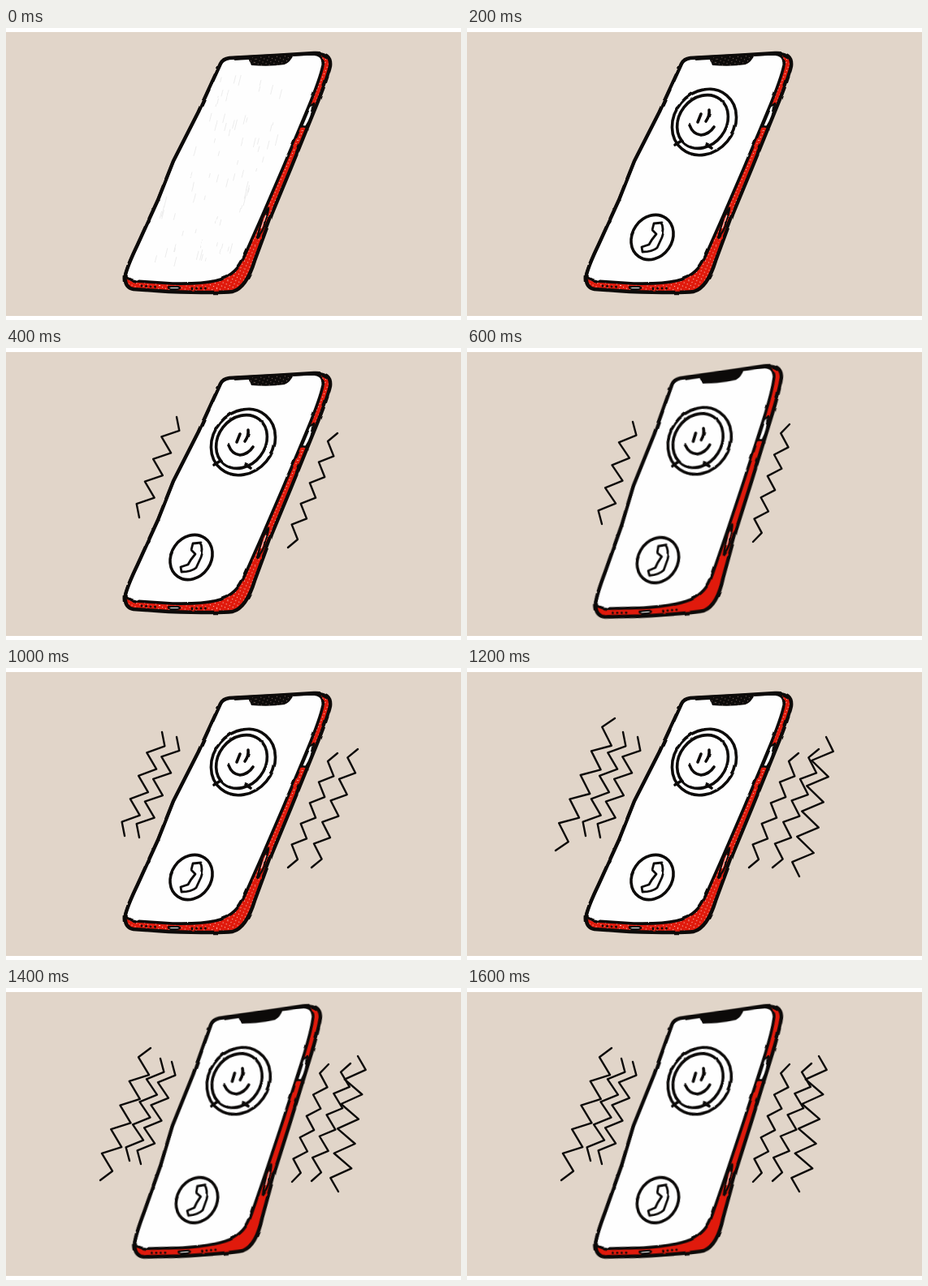
An HTML page that plays this animation: 560 by 360 pixels, repeating every 1800 ms.

```html
<!DOCTYPE html>
<html lang="en">
<head>
<meta charset="utf-8">
<title>Ringing phone</title>
<style>
  html, body { margin: 0; height: 100%; overflow: hidden; background: #fff; }
  svg { display: block; width: 560px; height: 360px; }
  .ink { fill: none; stroke: #0c0a09; stroke-linecap: round; stroke-linejoin: round; }
  .white { fill: #fefefe; }
  #scratches { stroke: #e4e4e4; stroke-width: .7; fill: none; }
</style>
</head>
<body>
<svg viewBox="0 0 560 360">
  <defs>
    <filter id="wobble" filterUnits="userSpaceOnUse" x="0" y="0" width="560" height="360" color-interpolation-filters="sRGB">
      <feTurbulence type="fractalNoise" baseFrequency=".06" seed="4"/>
      <feDisplacementMap in="SourceGraphic" scale="2.5" xChannelSelector="R" yChannelSelector="G"/>
    </filter>
    <pattern id="dots" width="4.4" height="4.4" patternUnits="userSpaceOnUse" patternTransform="rotate(24)">
      <circle cx="2.2" cy="2.2" r=".6" fill="#f8cfc6"/>
    </pattern>
    <path id="body" d="M264 44Q267 38 275 37L330 34L379 31Q401 30 399 47Q396 61 381 98L351 172L327 230L306 287Q296 320 279 325Q262 327 200 325L157 322Q145 320 147 304Q150 292 162 267L187 212L206 164L237 103Z"/>
    <path id="notch" d="M298 36L302 46Q325 48 343 45Q350 42 354 33Z"/>
  </defs>
  <rect y="5" width="560" height="350" fill="#e1d5c9"/>

  <g id="phone">
    <g filter="url(#wobble)">
      <use href="#body" fill="#e01a0c"/>
      <use class="dots" href="#body" fill="url(#dots)"/>
      <path class="ink white" stroke-width="3.6" d="M264 44Q267 38 275 37L330 34L376 32Q392 32 390 46Q387 61 372 98L341 172L316 230L293 282Q284 303 264 310Q245 316 205 315L160 312Q149 310 147 304Q150 292 162 267L187 212L206 164L237 103Z"/>
      <path id="scratches"/>
      <use href="#body" class="ink" stroke-width="4.4"/>
      <use href="#notch" fill="#0c0a09"/>
      <use class="dots" href="#notch" fill="url(#dots)" opacity=".5"/>
      <path class="ink white" stroke-width="2.4" d="M379 93L374 97L364 121L369 122Q377 110 379 93Z"/>
      <path class="ink" stroke-width="2.4" d="M323 222L316 233L309 259Q315 252 319 242Z"/>
      <path d="M320 231L314 247" stroke="#f3d9d2" stroke-width="1.2"/>
      <path class="ink white" stroke-width="2.2" d="M200 319L212 319Q217 321 211 322L203 322Q199 321 200 319Z"/>
      <path class="ink" stroke-width="2.8" stroke-dasharray="0 5.5" d="M167 318L187 319.5M229 321L250 321"/>
    </g>
    <g id="icons" class="ink" stroke-width="3.6" filter="url(#wobble)">
      <ellipse cx="292" cy="116" rx="37" ry="43" transform="rotate(40 292 116)"/>
      <ellipse cx="290" cy="115.500" rx="29" ry="35" transform="rotate(38 290 115.500)"/>
      <path d="M256 144L264 139M295 144L301 148M288 106L284 116M298 101Q299 108 294 115M274 120Q278 131 288 132Q298 131 304 122"/>
      <ellipse cx="228" cy="258" rx="24.500" ry="29" transform="rotate(35 228 258)"/>
      <path stroke-width="2.8" d="M230 241L240 240Q244 247 240 258L234 271Q228 276 216 276L215 270L224 267Q227 261 233 254L228 249Z"/>
    </g>
  </g>
  <g id="zigzags" class="ink" stroke-width="2.4"></g>
</svg>
<script>
const $ = id => document.getElementById(id);
const show = (el, on) => el.setAttribute('visibility', on ? 'visible' : 'hidden');
const LEFT = 1, RIGHT = -1;

// Alternates to both sides of the straight line from start to end.
function zigzag([x0, y0, x1, y1], segments, side, swing) {
  const dx = x1 - x0, dy = y1 - y0, length = Math.hypot(dx, dy);
  const points = [];
  for (let i = 0; i <= segments; i++) {
    const t = i / segments;
    const offset = i % segments ? side * swing * (i % 2 ? 1 : -1) / length : 0;
    points.push([x0 + dx * t - dy * offset, y0 + dy * t + dx * offset]);
  }
  return points.join(' ');
}

// Both poses are given as start and end points.
function addLine(wave, segments, side, swing, upright, tilted) {
  const el = document.createElementNS('http://www.w3.org/2000/svg', 'polyline');
  $('zigzags').append(el);
  return { el, wave, poses: [upright, tilted].map(ends => zigzag(ends, segments, side, swing)) };
}

const lines = [
  addLine(1, 9, RIGHT, 9, [210, 85, 164, 209], [204, 91, 166, 217]),
  addLine(1, 11, LEFT, 7, [408, 105, 347, 246], [397, 94, 352, 239]),
  addLine(2, 9, RIGHT, 9, [192, 79, 146, 207], [190, 87, 152, 213]),
  addLine(2, 11, LEFT, 8, [433, 100, 376, 246], [424, 93, 376, 238]),
  addLine(3, 11, LEFT, 10, [182, 62, 109, 225], [178, 74, 116, 237]),
  addLine(3, 11, RIGHT, 12, [442, 85, 409, 257], [433, 84, 409, 251])
];

let seed = 7;
const random = () => (seed = seed * 16807 % 2147483647) / 2147483647;
let scratches = '';
for (let i = 0; i < 70; i++) {
  const v = random(), length = 4 + random() * 10;
  const x = 258 - 98 * v + random() * 108, y = 58 + 235 * v;
  scratches += `M${x} ${y}l${-length * .25} ${length}`;
}
$('scratches').setAttribute('d', scratches);

const STEP = 200, STEPS = 9;

function draw() {
  const step = Math.floor(performance.now() / STEP) % STEPS;
  const wave = Math.min(3, step >> 1);
  const tilted = step > 0 && (step + 1) % 4 < 2;
  $('phone').setAttribute('transform', tilted ? 'rotate(-5 272 180)' : '');
  show($('icons'), step > 0);
  show($('scratches'), step === 0);
  document.querySelectorAll('.dots').forEach(el => show(el, !tilted));
  for (const line of lines) {
    show(line.el, line.wave <= wave);
    line.el.setAttribute('points', line.poses[+tilted]);
  }
  requestAnimationFrame(draw);
}
draw();
</script>
</body>
</html>
```
